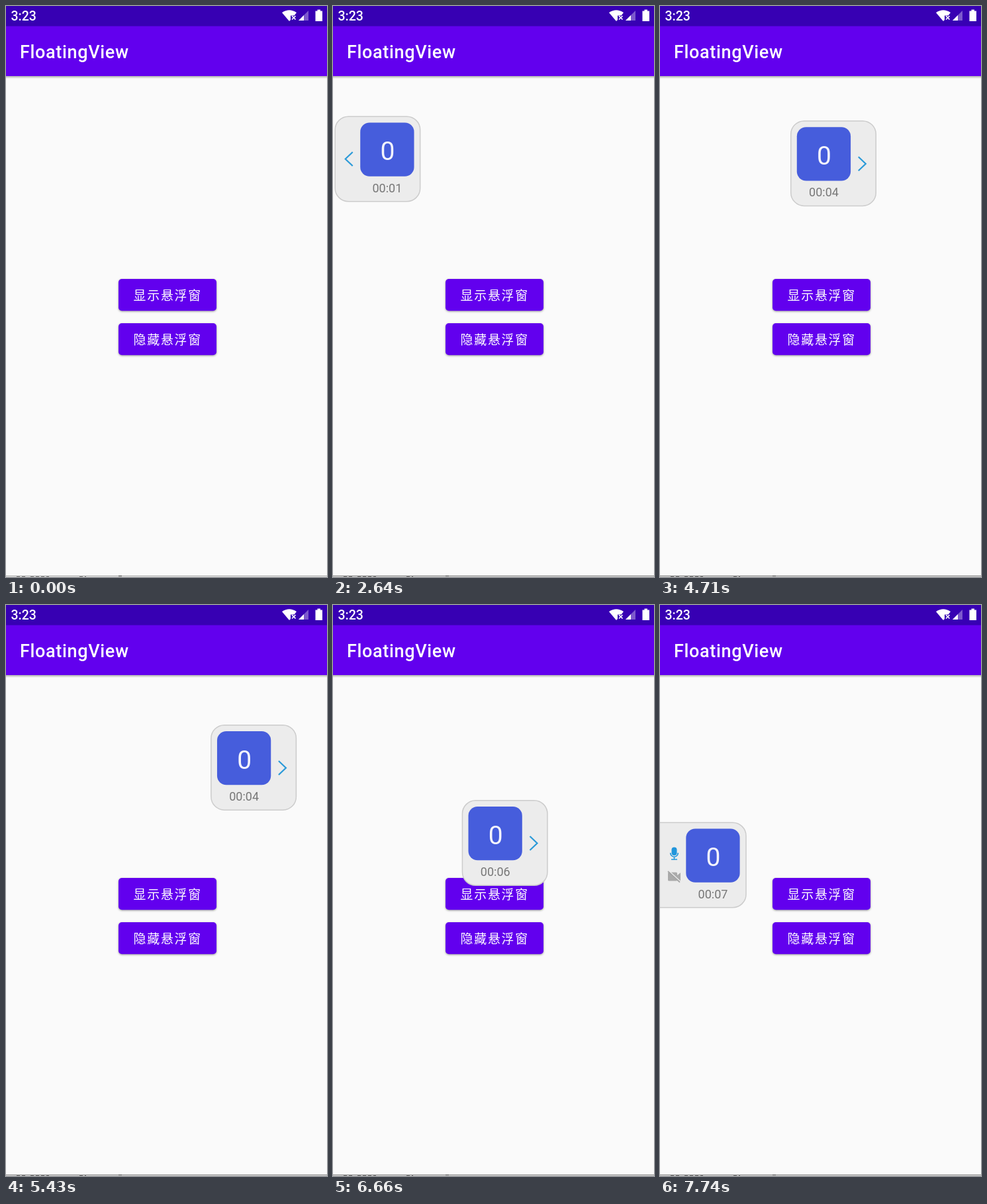
Recreate the animation shown at these times as an HTML page. Size 485 by 864 pixels, loop 8 s.

```html
<!DOCTYPE html>
<html lang="zh-CN">
<head>
<meta charset="utf-8">
<title>FloatingView</title>
<style>
  html, body { margin: 0; width: 100%; height: 100%; overflow: hidden; background: #fafafa; }
  svg { display: block; width: 485px; height: 864px; font-family: Roboto, sans-serif; }
  .label { font: 18.9px "Noto Sans CJK SC", "Noto Sans CJK", sans-serif; letter-spacing: 1.8px; fill: #fff; }
  .medium { font-weight: 500; fill: #fff; }
  .mid { text-anchor: middle; }
  .btn { fill: #6200ee; filter: drop-shadow(0 1px 1.5px rgba(0, 0, 0, .4)); }
</style>
</head>
<body>
<svg viewBox="0 0 485 864">
  <defs>
    <clipPath id="stage"><rect width="483" height="864"/></clipPath>
    <clipPath id="showClip"><rect x="170" y="413" width="148" height="48" rx="5"/></clipPath>
    <linearGradient id="barShadow" x2="0" y2="1">
      <stop stop-color="#000" stop-opacity=".3"/>
      <stop offset="1" stop-color="#000" stop-opacity="0"/>
    </linearGradient>
  </defs>
  <rect width="485" height="864" fill="#fafafa"/>

  <!-- status bar and app bar -->
  <rect y="106" width="485" height="4" fill="url(#barShadow)"/>
  <rect width="485" height="106" fill="#6200ee"/>
  <rect width="485" height="30.5" fill="#3700b3"/>
  <text class="medium" x="7.400" y="22" font-size="19.500">3:23</text>
  <text class="medium" x="21" y="79" font-size="27" letter-spacing=".65">FloatingView</text>
  <path d="M417 10q11-7.500 22 0l-3.500 4.500H430v6.500l-2 2z" fill="#fff"/>
  <path d="M432 15l5.500 5.500m0-5.500l-5.500 5.500" stroke="#fff" stroke-width="1.700"/>
  <path d="M457 7v15H442z" fill="#fff" opacity=".35"/>
  <path d="M450 14v8H442z" fill="#fff"/>
  <path d="M470.500 5.500h4.500v2h3v15.500h-10.500v-15.500h3z" fill="#fff"/>

  <!-- buttons -->
  <rect id="lift" x="168" y="414" width="152" height="53" rx="8" fill="#000" style="filter:blur(2.5px)"/>
  <rect class="btn" x="170" y="413" width="148" height="48.300" rx="5"/>
  <circle id="ripple" cx="244" cy="437" fill="#fff" clip-path="url(#showClip)"/>
  <rect class="btn" x="170" y="480" width="148" height="48.300" rx="5"/>
  <text class="label" x="192.500" y="444.500">显示悬浮窗</text>
  <text class="label" x="192.500" y="511.500">隐藏悬浮窗</text>

  <!-- window edge at the bottom -->
  <rect id="edge" y="862" width="485" height="1"/>
  <path d="M16 863.500h15m6 0h28m46 0h10" stroke="#888" stroke-dasharray="5 3"/>
  <path d="M170 862.500h5" stroke="#222"/>

  <!-- floating widget -->
  <g clip-path="url(#stage)">
    <g id="widget">
      <rect id="panel" y=".75" height="128.500" rx="20" fill="#ececec" stroke="#ccc" stroke-width="1.500"/>
      <g id="call">
        <rect x="9.800" y="10" width="81.300" height="81.300" rx="14" fill="#465ddc"/>
        <text class="mid" x="51" y="66.700" font-size="39" fill="#f4f4fc">0</text>
        <text id="clock" class="mid" x="50.500" y="115" font-size="18" fill="#777"></text>
      </g>
      <path id="arrow" fill="none" stroke="#2b9ad8" stroke-width="2.200"/>
      <g id="icons">
        <rect x="-4" y="38" width="8" height="12.500" rx="4" fill="#2196dc"/>
        <path d="M-5.800 46.500a5.800 6 0 0 0 11.600 0M0 53v3.500m-4.500 0h9" fill="none" stroke="#2196dc" stroke-width="1.600"/>
        <path d="M-8 76H3q1.500 0 1.500 1.500v3l5-4v12.500l-5-4v2.500q0 1.500-1.500 1.500H-8q-1.500 0-1.500-1.500v-10q0-1.500 1.500-1.500z" fill="#aaa"/>
        <path d="M-8.500 73.500l18 17" stroke="#ececec" stroke-width="2"/>
        <path d="M-9.500 74.500l18 16.500" stroke="#a4a4a4" stroke-width="1.700"/>
      </g>
    </g>
  </g>
</svg>
<script>
const LOOP = 8000, STEP = 30;
const LEFT = 2, RIGHT = 353, MIDDLE = 177.5;
const GLIDE = 300, SETTLE = 330;
const SECOND = 960, FIRST_TICK = 1830;
const $ = id => document.getElementById(id);
const set = (id, attrs) => { for (const k in attrs) $(id).setAttribute(k, attrs[k]); };
const span = (t, a, b) => Math.max(0, Math.min(1, (t - a) / (b - a)));
const smooth = p => (1 - Math.cos(Math.PI * p)) / 2;
const mix = (a, b, p) => a + (b - a) * p;

// Finger drags; on release the widget glides to the nearer side and parks there.
const drags = [
  { from: 1830, to: 2340, x: 150, y: 166.5, release: 2350 },
  { from: 2980, to: 3270, x: 185, y: 177 },
  { from: 3740, to: 3930, x: 147, y: 177 },
  { from: 4360, to: 4710, x: 197, y: 173.2, release: 4770 },
  { from: 5350, to: 5610, x: 150, y: 209, release: 5610 },
  { from: 6190, to: 6420, x: 178, y: 295, release: 6600 },
  { from: 7090, to: 7230, x: 201, y: 311.2 },
  { from: 7300, to: 7410, x: 168, y: 328.5, release: 7410 }
];

function pose(t) {
  let x = RIGHT, y = 118, parked = true;
  for (const d of drags) {
    if (t <= d.from) break;
    const p = smooth(span(t, d.from, d.to));
    x = mix(x, d.x, p);
    y = mix(y, d.y, p);
    parked = false;
    if (t > d.release) {
      x = mix(x, x > MIDDLE ? RIGHT : LEFT, smooth(span(t, d.release, d.release + GLIDE)));
      parked = t >= d.release + SETTLE;
    }
  }
  const right = x > MIDDLE;
  if (parked && !right) x = .5;
  return { x, y, right, parked };
}

function drawWidget(t) {
  const { x, y, right, parked } = pose(t);
  set('widget', { transform: `translate(${x} ${y})`, opacity: span(t, 900, 1050) });
  set('panel', { x: parked && !right ? -40 : .75, width: parked ? 169.5 : 128.5 });
  set('call', { transform: `translate(${right ? 0 : 29} 0)` });
  set('arrow', {
    d: right ? 'M102.800 55l11 10.500-11 10.500' : 'M27.300 54.500l-11 10.500 11 10.500',
    opacity: +!parked
  });
  set('icons', { transform: `translate(${right ? 108 : 21} 0)`, opacity: +parked });
  const seconds = Math.max(0, 1 + Math.floor((t - FIRST_TICK) / SECOND));
  $('clock').textContent = '00:0' + seconds;
}

function draw(t) {
  const press = span(t, 570, 780);
  const glow = press * (1 - span(t, 930, 1170));
  set('ripple', { r: 20 + 60 * smooth(press), opacity: .22 * glow });
  set('lift', { opacity: .2 * glow });
  set('edge', { fill: t < 600 ? '#999' : '#666' });
  drawWidget(t);
}

function frame() {
  const t = performance.now() % LOOP;
  draw(Math.floor(t / STEP) * STEP);
  requestAnimationFrame(frame);
}
frame();
</script>
</body>
</html>
```
